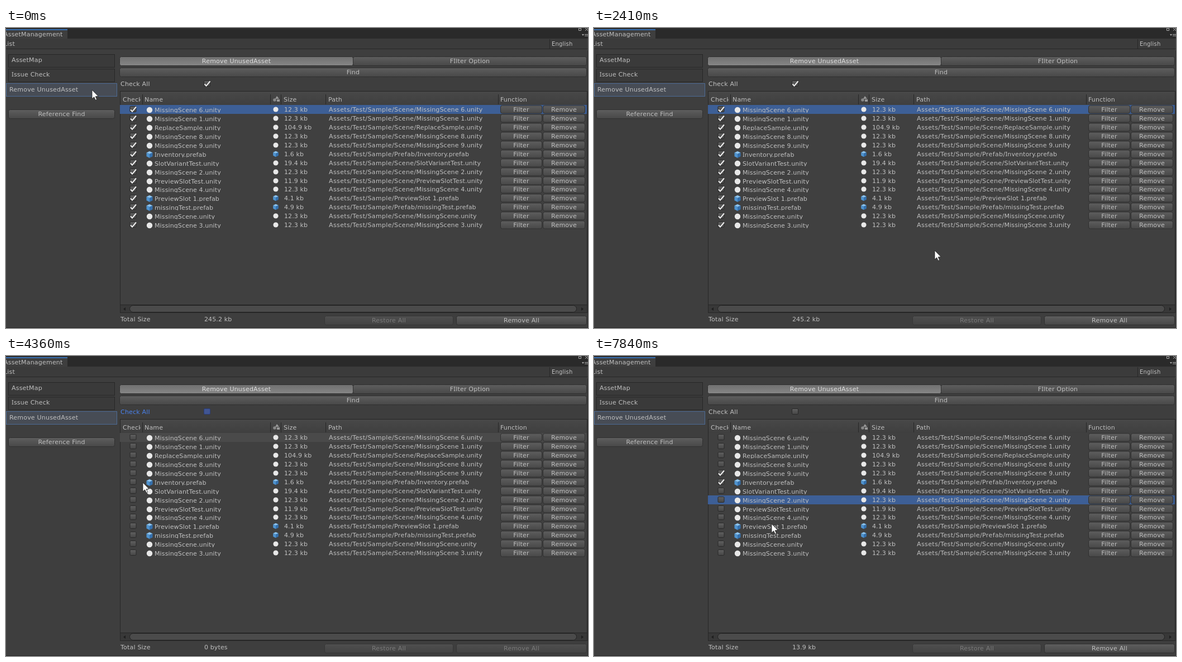
Recreate the animation shown at these times as an HTML page. Size 1042 px wide and 538 px high, loop 7.99 s.

```html
<!DOCTYPE html>
<html lang="en">
<head>
<meta charset="utf-8">
<title>Asset list</title>
<style>
  html, body { margin: 0; width: 100%; height: 100%; overflow: hidden; background: #3e3e3e; }
  svg { display: block; }
  #stage { position: absolute; left: 0; top: 0; }
  text { font: 11px "DejaVu Sans", Verdana, sans-serif; letter-spacing: .2px; fill: #c0c0c0; white-space: pre; }
  .cap { font-family: "Noto Sans", sans-serif; }
  .file { letter-spacing: .12px; }
  .folder { letter-spacing: .38px; }
  .small { font-size: 10px; }
  .mid { text-anchor: middle; }
  .btn rect { stroke: #303030; }
  .lit text { fill: #dedede; }
  .off text { fill: #7b7b7b; }
  .off rect { opacity: .55; }
  .tick { fill: none; stroke: #f0f0f0; stroke-width: 2; visibility: hidden; }
  .on .tick { visibility: visible; }
  .box { fill: url(#toggle); stroke: #292929; }
  .focus text { fill: #4a82ee; }
  .focus .box { fill: #405592; stroke: #2a3c78; }
</style>
</head>
<body>
<svg id="stage" width="1042" height="538" viewBox="0 0 1042 538">
  <defs>
    <linearGradient id="plain" x2="0" y2="1"><stop stop-color="#5e5e5e"/><stop offset="1" stop-color="#484848"/></linearGradient>
    <linearGradient id="lit" x2="0" y2="1"><stop stop-color="#707070"/><stop offset="1" stop-color="#868686"/></linearGradient>
    <linearGradient id="head" x2="0" y2="1"><stop stop-color="#484848"/><stop offset="1" stop-color="#3f3f3f"/></linearGradient>
    <linearGradient id="toggle" x2="0" y2="1"><stop stop-color="#606060"/><stop offset="1" stop-color="#464646"/></linearGradient>
    <g id="cube">
      <path d="M0-6 5.5-3.5 0-1-5.5-3.5Z" fill="#8cc4f0"/>
      <path d="M-5.5-3.5 0-1V6L-5.5 3.2Z" fill="#4f93cf"/>
      <path d="M5.5-3.5 0-1V6L5.5 3.2Z" fill="#3470ad"/>
    </g>
    <circle id="dot" r="5.2" fill="#e8e8e8"/>
  </defs>
  <g id="ui"></g>
  <path id="cursor" d="M0 0V16L3.7 12.7 6.2 18.3 8.6 17.2 6.2 11.8 11.2 11.5Z" fill="#fff" stroke="#222" stroke-width=".8"/>
</svg>
<script>
const LOOP = 7990, TOP = 138, ROW = 15.94, STEP = 76;
const PRESS = 3400, CLEAR = 3460, PICK = 7440;
const $ = id => document.getElementById(id);

const rect = (x, y, w, h, fill, more = '') =>
  `<rect x="${x}" y="${y}" width="${w}" height="${h}" fill="${fill}" ${more}/>`;
const line = (x, y, w, h) => rect(x, y, w, h, '#272727');
const frame = (x, y, w, h, fill, edge = '#272727') =>
  rect(x + .5, y + .5, w - 1, h - 1, fill, `stroke="${edge}"`);
const serifI = s => s.replace(/I/g, '<tspan class="cap">I</tspan>');
const label = (s, x, y, kind = '') =>
  `<text x="${x}" y="${y}" class="${kind}">${serifI(s)}</text>`;
const button = (s, x, y, w, h, look = 'plain', id = '') =>
  `<g class="btn ${look}" id="${id}">` +
  rect(x + .5, y + .5, w - 1, h - 1, `url(#${look === 'lit' ? 'lit' : 'plain'})`, 'rx="3"') +
  label(s, x + w / 2, Math.round(y + h / 2 + 3.5), 'mid') + '</g>';
const check = (x, y, id) =>
  `<g id="${id}" transform="translate(${x} ${y})">` +
  '<rect class="box" x="-5.5" y="-5.5" width="11" height="10" rx="1.5"/>' +
  '<path class="tick" d="M-4.5 .5-1.5 3.8 5.5-4.5"/></g>';
const clip = (x, y, w, h, body) =>
  `<svg x="${x}" y="${y}" width="${w}" height="${h}" overflow="hidden">${body}</svg>`;
const icon = (name, x, y, size = 1) =>
  `<use href="#${name}" transform="translate(${x} ${y}) scale(${size})"/>`;

const files = `Scene/MissingScene 6.unity|12.3
Scene/MissingScene 1.unity|12.3
Scene/ReplaceSample.unity|104.9
Scene/MissingScene 8.unity|12.3
Scene/MissingScene 9.unity|12.3
Prefab/Inventory.prefab|1.6
Scene/SlotVariantTest.unity|19.4
Scene/MissingScene 2.unity|12.3
Scene/PreviewSlotTest.unity|11.9
Scene/MissingScene 4.unity|12.3
PreviewSlot 1.prefab|4.1
Prefab/missingTest.prefab|4.9
Scene/MissingScene.unity|12.3
Scene/MissingScene 3.unity|12.3`.split('\n').map(row => row.split('|'));

function fileRow([path, size], i) {
  const y = Math.round(TOP + i * ROW), base = y + 12;
  const name = path.split('/').pop();
  const kind = name.endsWith('prefab') ? 'cube' : 'dot';
  const folder = 'Assets/Test/Sample/' + path.slice(0, -name.length);
  return check(227.5, y + 8, 'check' + i) +
    icon(kind, 257, y + 9) +
    clip(264, y, 208, 14, label(name, 2, 13.4, 'file')) +
    icon(kind, 483, y + 8, .88) +
    label(size + ' kb', 498, base, 'file') +
    `<text x="578" y="${base}"><tspan class="folder">${folder}</tspan><tspan class="file">${serifI(name)}</tspan></text>` +
    button('Filter', 885, y + .5, 75, 15) +
    button('Remove', 961, y + .5, 76, 15);
}

$('ui').innerHTML = [
  // window frame and toolbar
  rect(0, 0, 1042, 19, '#2a2a2a'),
  rect(0, 2, 110, 17, '#3e3e3e'), rect(0, 2, 110, 2, '#3a72b4'),
  label('AssetManagement', -4, 15),
  '<path d="M1025.5 .5h4v4h-4zM1037 0l5 5m0-5l-5 5M1036 11.5h6m-6 2.5h6" stroke="#aaa" fill="none"/>',
  '<path d="M1031 11h4l-2 3z" fill="#aaa"/>',
  rect(0, 19, 1042, 19, '#3b3b3b'), line(0, 37, 1042, 1), line(973, 20, 1, 17),
  label('List', -4, 32), label('English', 977, 31.5, 'small'),

  // side menu
  frame(4, 47, 191, 24, '#3a3a3a'), frame(4, 73, 191, 24, '#3a3a3a'),
  frame(0, 99, 199, 24, '#474c55', '#4d6b95'),
  label('AssetMap', 10, 61), label('Issue Check', 10, 87), label('Remove UnusedAsset', 6, 114),
  button('Reference Find', 4, 146, 191, 17),

  // tabs and check-all line
  button('Remove UnusedAsset', 203, 51, 419, 17, 'lit'),
  button('FIlter Option', 621, 51, 419, 17),
  button('Find', 203, 71, 837, 17),
  '<g id="all">', label('Check All', 205, 104), check(360, 100, 'checkAll'), '</g>',

  // table
  frame(204, 113, 837, 398, '#404040'),
  rect(205, 114, 835, 24, 'url(#head)'),
  clip(205, 114, 35.5, 24, label('Check', 4, 18)),
  label('Name', 248, 132), label('Size', 497, 132), label('Path', 577, 132), label('Function', 885, 132, 'file'),
  [244, 473, 492, 572, 881].map(x => line(x, 119, 1, 18)).join(''),
  '<path d="M485 122l4 5h-7zM485 128h5v4h-5z" fill="#999"/><circle cx="481" cy="129" r="2.8" fill="#888"/>',
  '<rect id="pick" x="204" width="836" height="16"/>',
  files.map(fileRow).join(''),

  // scroll bar and footer
  frame(204, 496, 837, 15, '#383838'),
  rect(221.5, 497.5, 800, 12, '#4b4b4b', 'rx="6" stroke="#232323"'),
  '<path d="M214 501v6l-4-3zM1030 501v6l4-3z" fill="#1e1e1e"/>',
  label('Total Size', 205, 526), '<text id="total" class="file" x="355" y="526"></text>',
  button('Restore All', 570, 516, 231, 17, 'off'),
  button('Remove All', 806, 516, 234, 17, '', 'removeAll'),
  line(1041, 40, 1, 498), line(0, 537, 1042, 1)
].join('');

// Pointer strokes: first and last step in ms, end point, sideways bow of the arc.
const strokes = [
  [460, 1220, 622, 100, -275],
  [1310, 1470, 254, 108, -105],
  [1560, 1620, 600, 420, -150],
  [1770, 2160, 342, 300, -200],
  [2240, 2560, 578, 158, -250],
  [2620, 3160, 366, 87, -25],
  [3310, 3310, 364, 97, 0],
  [3910, 4360, 245, 227, 0],
  [4450, 4600, 231, 226, 0],
  [4750, 4820, 228, 212, 0],
  [5820, 5970, 228, 221, 0],
  [6890, 7290, 306, 258, 0],
  [7680, 7840, 318, 301, 0]
];

// The pointer advances in even steps of about STEP ms and rests between strokes.
function pointer(t) {
  let x = 154, y = 111;
  for (const [from, to, endX, endY, bow] of strokes) {
    if (t < from) break;
    const gaps = Math.round((to - from) / STEP);
    const done = gaps ? Math.min(gaps, Math.floor((t - from + 12) / (to - from) * gaps)) : 0;
    const u = (done + 1) / (gaps + 1), ease = u * u * (3 - 2 * u);
    const dx = endX - x, dy = endY - y;
    const side = bow * Math.sin(Math.PI * ease) / Math.hypot(dx, dy);
    x += dx * ease + dy * side;
    y += dy * ease - dx * side;
  }
  return [x, y].map(Math.round);
}

function draw(t) {
  $('cursor').setAttribute('transform', `translate(${pointer(t)})`);

  const full = t < CLEAR, focus = t >= PRESS && t < PICK;
  const isOn = i => full || (i === 4 && t >= 4960) || (i === 5 && t >= 6430);
  let sum = 0;
  files.forEach(([, size], i) => {
    $('check' + i).classList.toggle('on', isOn(i));
    if (isOn(i)) sum += +size;
  });
  $('checkAll').classList.toggle('on', full);
  $('all').classList.toggle('focus', focus);
  $('removeAll').classList.toggle('off', !sum);
  // the full list counts unrounded sizes
  $('total').textContent = full ? '245.2 kb' : sum ? sum.toFixed(1) + ' kb' : '0 bytes';
  $('pick').setAttribute('y', Math.round(TOP + (t >= PICK ? 7 * ROW : 0)));
  $('pick').setAttribute('fill', focus ? '#4a4a4a' : '#3d5f96');
}

const start = performance.now();
function tick() {
  draw((performance.now() - start) % LOOP);
  requestAnimationFrame(tick);
}
tick();
</script>
</body>
</html>
```
